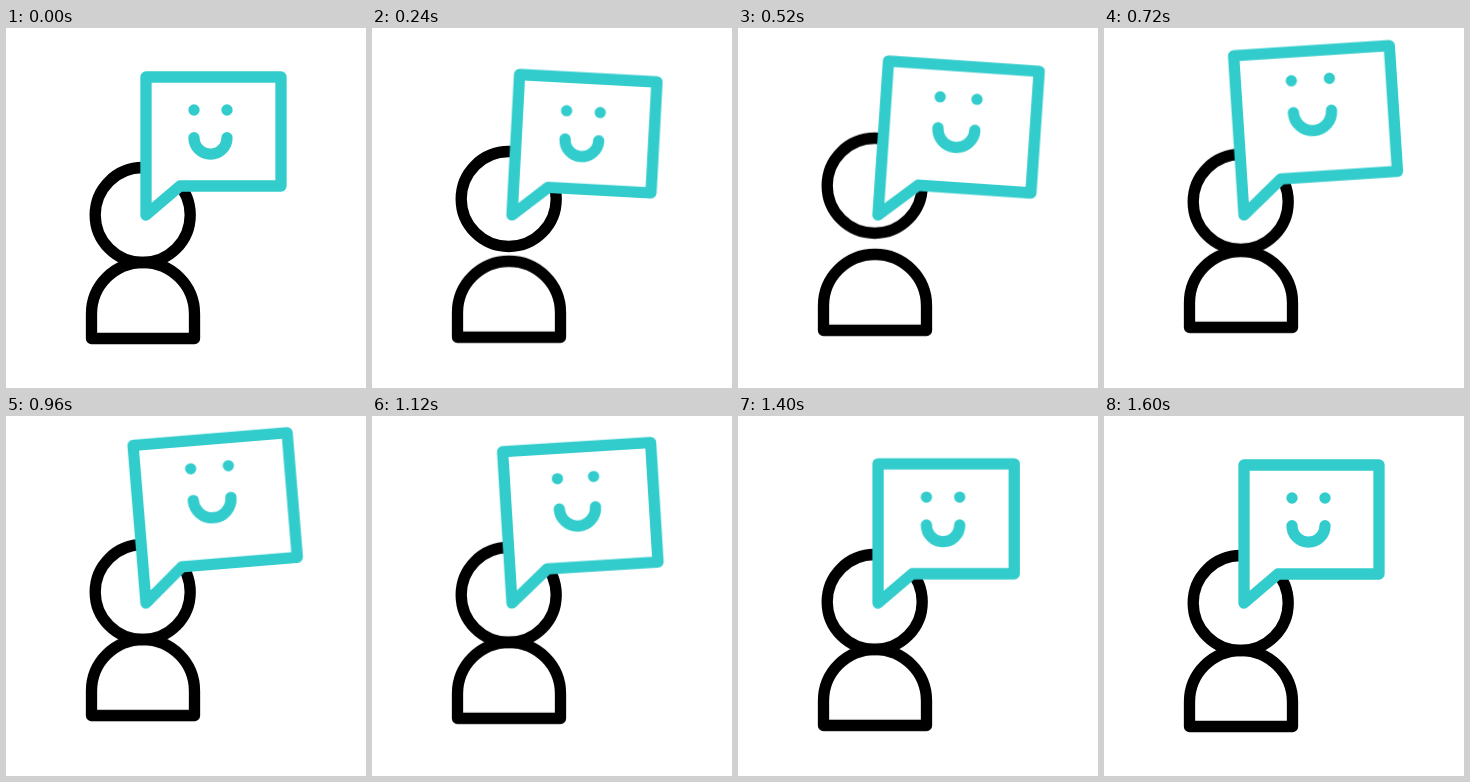
Animation of 360x360 px, one loop 1640 ms. Source, as an HTML page:

```html
<!DOCTYPE html>
<html lang="en">
<head>
<meta charset="utf-8">
<title>Cheerful speech bubble</title>
<style>
  html, body { margin: 0; width: 100%; height: 100%; overflow: hidden; background: #fff; }
  svg { display: block; width: 100vw; height: 100vh; }

  .line { fill: none; stroke-width: 11.3; stroke-linecap: round; stroke-linejoin: round; }
  .person { stroke: #000; }
  .speech { stroke: #3cc; }
  .speech path { vector-effect: non-scaling-stroke; }

  .bob, .hop, .tilt, .grow, .face {
    animation: 1640ms cubic-bezier(.5, 0, .5, 1) infinite;
  }
  .bob  { animation-name: bob; }
  .hop  { animation-name: hop; }
  .face { animation-name: face; }
  .tilt, .grow { transform-origin: 140px 187px; }
  .tilt { animation-name: tilt; }
  .grow { animation-name: grow; }

  @keyframes bob {
    0%, 2.44%, 96.34%, 100% { transform: translateY(0); }
    50.6% { transform: translateY(-11.5px); }
  }
  @keyframes hop {
    0%, 2.44%, 49.1%, 100% { transform: translateY(0); }
    23.78%, 27.1% { transform: translateY(-22.9px); }
  }
  @keyframes tilt {
    0%, 2.44%, 79.27%, 100% { transform: rotate(0deg); }
    23.78%, 26.22% { transform: rotate(4.8deg); }
    49.7%, 62.2% { transform: rotate(-4.7deg); }
  }
  @keyframes grow {
    0%, 2.44%, 93.9%, 100% { transform: scale(1); }
    48.5% { transform: scale(1.158); }
  }
  @keyframes face {
    0%, 12.2%, 85.37%, 100% { transform: translate(0, 0); }
    52.44%, 54.88% { transform: translate(.5px, -8.8px); }
  }
</style>
</head>
<body>
<svg viewBox="0 0 360 360">
  <g class="line person">
    <g class="bob">
      <path d="M85.5 310.5V286a51.5 51.5 0 0 1 103 0v24.5z"/>
      <circle class="hop" cx="136.7" cy="187" r="47.5"/>
    </g>
  </g>
  <g class="tilt">
    <g class="grow line speech">
      <path fill="#fff" d="M140 187V49H275V158H174z"/>
      <g class="face">
        <path d="M188 82h.01M221 82h.01"/>
        <path d="M188 109.7a16.5 16.5 0 0 0 33 0"/>
      </g>
    </g>
  </g>
</svg>
</body>
</html>
```
